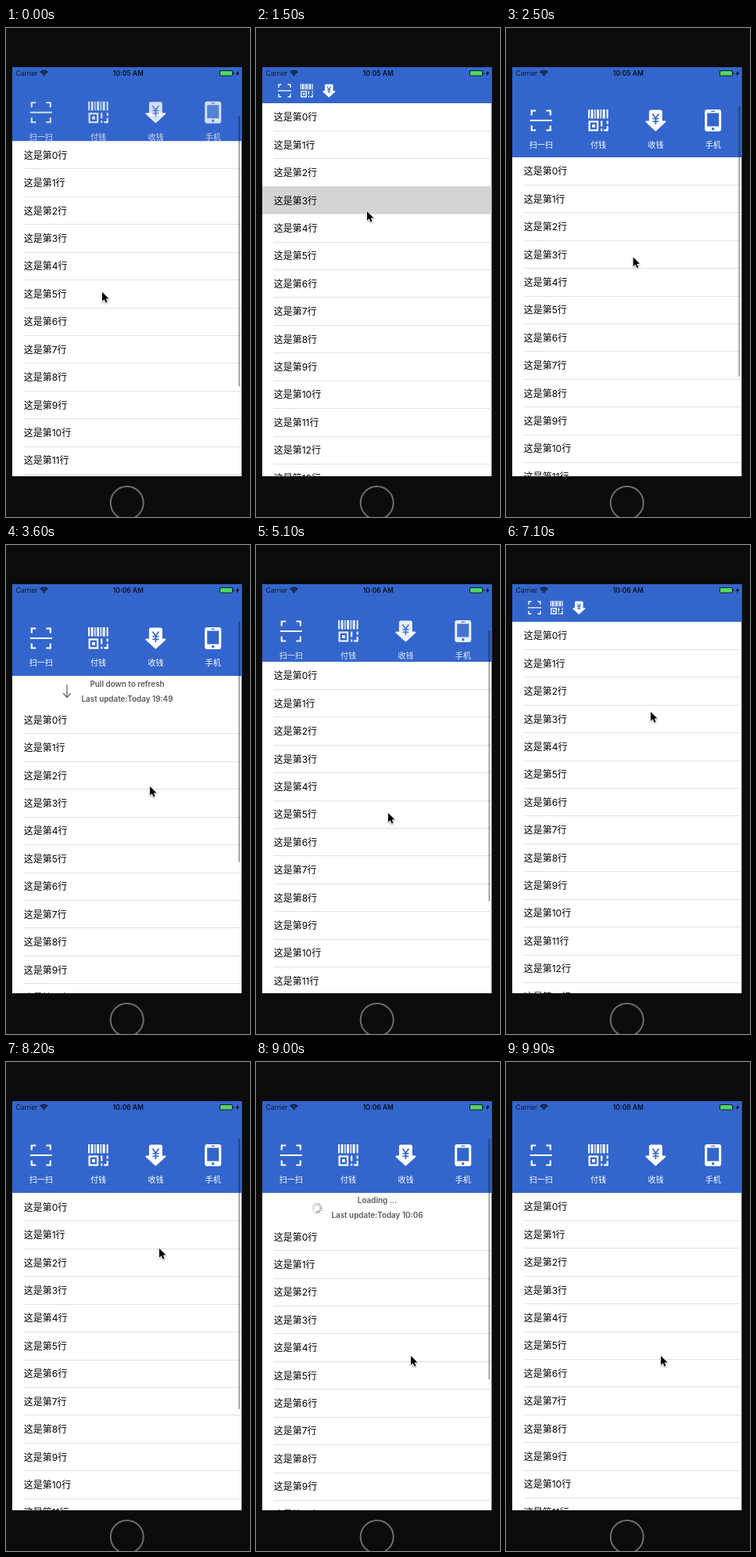
An HTML page with a canvas that plays this animation: 312 px wide and 624 px high, repeating every 10000 ms.

```html
<!DOCTYPE html>
<html lang="zh-CN">
<head>
<meta charset="utf-8">
<style>
html, body { margin: 0; width: 100%; height: 100%; overflow: hidden; background: #0b0b0b; }
canvas { display: block; width: 312px; height: 624px; }
</style>
</head>
<body>
<canvas id="stage"></canvas>
<script>
const canvas = document.getElementById('stage');
const ctx = canvas.getContext('2d');
const ratio = window.devicePixelRatio || 1;
canvas.width = 312 * ratio;
canvas.height = 624 * ratio;

const LOOP = 10000, STEP = 100;
const BLUE = '#3366cc';
const FONT = 'Inter, "Noto Sans CJK SC", "Noto Sans CJK", sans-serif';
const ROW = 35.42, EXPANDED = 167, COLLAPSE = 71, REFRESH = 38.3;
const LEFT = 8, RIGHT = 301.5, TOP = 50, BOTTOM = 572;

// time, scroll offset (negative while pulling down)
const SCROLL = [
  [0, 22.5], [300, 42], [500, 56], [800, 71], [1500, 71], [1600, 70], [2000, 30],
  [2400, 3], [2700, 0], [3150, 0], [3600, -38.5], [3900, -58], [4050, -58],
  [4250, -REFRESH], [4450, -REFRESH], [4750, 0], [4800, 0], [5100, 18], [5600, 48],
  [6300, 71], [7000, 71], [7100, 69], [7500, 28], [7800, 2], [8000, 0], [8180, 0],
  [8200, -0.5], [8500, -42], [8700, -60], [8800, -60], [9000, -REFRESH],
  [9500, -REFRESH], [9850, 0]
];
// time, pointer x, pointer y
const POINTER = [
  [0, 123, 337], [500, 126, 300], [1100, 142, 234], [1500, 142, 234], [2000, 155, 274],
  [2400, 160, 302], [3150, 180, 231], [3600, 184, 308], [3900, 186, 347], [4400, 180, 360],
  [4800, 172, 360], [5100, 169, 342], [5600, 170, 312], [6000, 172, 295], [6600, 182, 225],
  [7000, 185, 211], [7100, 185, 213], [7500, 188, 254], [7800, 191, 280], [8180, 196, 237],
  [8200, 196, 238], [8500, 197, 322], [8700, 198, 358], [8900, 198, 375]
];
const BAR_VISIBLE = [[0, 800], [1600, 2800], [3200, 4200], [4900, 6300], [7200, 9300]];
const LOADING = [[4050, 4450], [8800, 9500]];

const clamp = (v, lo = 0, hi = 1) => Math.min(hi, Math.max(lo, v));
const within = (t, spans) => spans.some(([a, b]) => t >= a && t < b);

function sample(keys, t, column = 1) {
  const i = keys.findIndex(k => k[0] > t);
  if (i < 0) return keys[keys.length - 1][column];
  const a = keys[i - 1], b = keys[i];
  return a[column] + (b[column] - a[column]) * (t - a[0]) / (b[0] - a[0]);
}

function rect(x, y, w, h, color) {
  ctx.fillStyle = color;
  ctx.fillRect(x, y, w, h);
}

function roundRect(x, y, w, h, r, color) {
  ctx.fillStyle = color;
  ctx.beginPath();
  ctx.roundRect(x, y, w, h, r);
  ctx.fill();
}

function shape(points, color) {
  ctx.fillStyle = color;
  ctx.beginPath();
  points.forEach(([x, y]) => ctx.lineTo(x, y));
  ctx.closePath();
  ctx.fill();
}

function line(points, color, width) {
  ctx.strokeStyle = color;
  ctx.lineWidth = width;
  ctx.beginPath();
  points.forEach(([x, y], i) => i ? ctx.lineTo(x, y) : ctx.moveTo(x, y));
  ctx.stroke();
}

function text(str, x, y, size, color, weight = 400, align = 'left') {
  ctx.font = `${weight} ${size}px ${FONT}`;
  ctx.textAlign = align;
  ctx.textBaseline = 'alphabetic';
  ctx.fillStyle = color;
  ctx.fillText(str, x, y + size * 0.37);
}

function clipped(x, y, w, h, draw) {
  ctx.save();
  ctx.beginPath();
  ctx.rect(x, y, w, h);
  ctx.clip();
  draw();
  ctx.restore();
}

// Icons are drawn around 0,0 in a box of about 28 units.
function scanIcon() {
  for (const sx of [-1, 1]) for (const sy of [-1, 1])
    line([[sx * 6.5, sy * 12.5], [sx * 12, sy * 12.5], [sx * 12, sy * 6.5]], '#fff', 2.2);
  rect(-14, -1, 28, 2, '#fff');
}

function payIcon() {
  [[-13, 2], [-9.5, 3], [-5, 1.5], [-2, 3], [2.5, 1.5], [5.5, 3], [10.5, 2]]
    .forEach(([x, w]) => rect(x, -14, w, 11.5, '#fff'));
  ctx.strokeStyle = '#fff';
  ctx.lineWidth = 2.2;
  ctx.strokeRect(-11.5, 1.5, 10.5, 11);
  rect(-8, 5, 3.8, 4, '#fff');
  rect(3, 0.5, 2.2, 7, '#fff');
  rect(3, 10.5, 2.2, 3, '#fff');
  rect(10.5, 0.5, 2.2, 4, '#fff');
  rect(10.5, 7, 2.2, 6.5, '#fff');
  rect(7, 11.3, 5, 2.2, '#fff');
}

function collectIcon() {
  roundRect(-8.5, -13.5, 17, 18, 2.5, '#fff');
  ctx.lineJoin = 'round';
  const head = [[-12, 1.5], [12, 1.5], [0, 12.5], [-12, 1.5], [12, 1.5]];
  shape(head, '#fff');
  line(head, '#fff', 2);
  line([[-4, -8.5], [0, -3], [4, -8.5]], BLUE, 1.7);
  line([[0, -3], [0, 5]], BLUE, 1.7);
  line([[-4, -2.3], [4, -2.3]], BLUE, 1.4);
  line([[-4, 1.2], [4, 1.2]], BLUE, 1.4);
  ctx.lineJoin = 'miter';
}

function phoneIcon() {
  roundRect(-10.5, -14, 21, 28, 3, '#fff');
  rect(-7.5, -9.5, 15, 17, BLUE);
  rect(-2.5, -12.3, 5, 1.2, BLUE);
  ctx.fillStyle = BLUE;
  ctx.beginPath();
  ctx.arc(0, 10.7, 1.7, 0, 7);
  ctx.fill();
}

const ACTIONS = [['扫一扫', scanIcon], ['付钱', payIcon], ['收钱', collectIcon], ['手机', phoneIcon]];

function placed(draw, x, y, scale = 1) {
  ctx.save();
  ctx.translate(x, y);
  ctx.scale(scale, scale);
  draw();
  ctx.restore();
}

function drawHeader(s) {
  const bottom = EXPANDED - clamp(s, 0, COLLAPSE);
  const shift = clamp(s, 0, COLLAPSE) / 2;
  clipped(LEFT, TOP, RIGHT - LEFT, bottom - TOP, () => {
    rect(LEFT, TOP, RIGHT - LEFT, bottom - TOP, BLUE);
    ctx.globalAlpha = clamp(1 - (s - 14) / 38);
    ACTIONS.forEach(([label, icon], i) => {
      const x = 44.8 + i * 73.3;
      placed(icon, x, 119 - shift);
      text(label, x, 150.5 - shift, 10, '#fff', 300, 'center');
    });
    ctx.globalAlpha = clamp((s - 40) / 26);
    ACTIONS.slice(0, 3).forEach(([, icon], i) => placed(icon, 36.5 + i * 28.4, 80, 0.62));
    ctx.globalAlpha = 1;
  });
}

function drawStatus(t) {
  text('Carrier', 12.5, 58, 8.5, '#10182a');
  ctx.lineCap = 'butt';
  for (const r of [2.6, 4.6, 6.6]) {
    ctx.strokeStyle = '#0a0f1c';
    ctx.lineWidth = 1.4;
    ctx.beginPath();
    ctx.arc(48.5, 61, r, -Math.PI * 0.76, -Math.PI * 0.24);
    ctx.stroke();
  }
  shape([[47, 60], [50, 60], [48.5, 61.5]], '#0a0f1c');
  text(t < 2600 ? '10:05 AM' : '10:06 AM', 156.3, 58, 8.5, '#0a0f1c', 600, 'center');
  roundRect(273, 54, 17, 7.6, 2, '#10182a');
  roundRect(274, 55, 15, 5.6, 1.2, '#4cd964');
  rect(290.5, 56.5, 1, 2.6, '#10182a');
  shape([[297.3, 54], [293.7, 58.5], [295.6, 58.5], [294.7, 61.8], [298.4, 57.1], [296.4, 57.1]], '#0a0f1c');
}

function drawRefresh(t, s) {
  const top = EXPANDED - s - REFRESH;
  const loading = within(t, LOADING);
  const release = !loading && s < -39 && !(t > 4450 && t < 4800);
  const title = loading ? 'Loading ...' : release ? 'Release to refresh' : 'Pull down to refresh';
  const updated = t >= 4450 ? '10:06' : '19:49';
  text(title, 155, top + 9.7, 9.9, '#5a5a5a', 600, 'center');
  text('Last update:Today ' + updated, 155, top + 28.7, 9.9, '#5a5a5a', 600, 'center');
  ctx.save();
  ctx.translate(78, top + 19.5);
  if (loading) {
    ctx.rotate(Math.floor(t / STEP) * Math.PI / 6);
    for (let i = 0; i < 12; i++) {
      ctx.rotate(Math.PI / 6);
      ctx.globalAlpha = 0.25 + i * 0.06;
      line([[0, -3.5], [0, -7]], '#777', 1.4);
    }
  } else {
    if (release) ctx.rotate(Math.PI);
    line([[0, -8.5], [0, 7.5]], '#555', 1.2);
    line([[-5, 2.5], [0, 7.7], [5, 2.5]], '#555', 1.2);
  }
  ctx.restore();
}

function drawList(t, s) {
  clipped(LEFT, TOP, RIGHT - LEFT, BOTTOM - TOP, () => {
    rect(LEFT, TOP, RIGHT - LEFT, BOTTOM - TOP, '#fff');
    if (s < 0) drawRefresh(t, s);
    for (let i = 0; i < 15; i++) {
      const y = EXPANDED - s + i * ROW;
      if (i === 3 && t >= 1500 && t < 1700)
        rect(LEFT, Math.round(y), RIGHT - LEFT, 35.5, '#d4d4d4');
      else
        rect(22.5, Math.round(y + ROW - 0.5), RIGHT - 22.5, 1, '#e1e1e1');
      text(`这是第${i}行`, 22.7, y + 17.8, 12, '#000');
    }
  });
}

function drawScrollBar(t, s) {
  const fade = Math.max(...BAR_VISIBLE.map(([a, b]) => t < a ? 0 : clamp(1 - (t - b) / 250)));
  const top = 98 + Math.max(s, 0) * 0.62;
  roundRect(297.3, top, 2, 345.5 + Math.min(s, 0), 1, `rgba(0,0,0,${0.36 * fade})`);
}

function drawPointer(x, y) {
  const arrow = [[0, 0], [0, 11.6], [2.7, 9.2], [4.6, 13.4], [6.5, 12.6], [4.7, 8.4], [8.3, 8.2]];
  ctx.save();
  ctx.translate(x, y);
  ctx.shadowColor = 'rgba(0,0,0,.35)';
  ctx.shadowBlur = 2 * ratio;
  ctx.shadowOffsetY = ratio;
  ctx.lineJoin = 'round';
  line([...arrow, arrow[0]], '#fff', 1.6);
  ctx.shadowColor = 'transparent';
  shape(arrow, '#000');
  ctx.restore();
}

function draw(now) {
  const t = Math.floor(now % LOOP / STEP) * STEP;
  const s = sample(SCROLL, t);
  ctx.setTransform(ratio, 0, 0, ratio, 0, 0);
  rect(0, 0, 312, 624, '#0b0b0b');
  drawList(t, s);
  drawHeader(s);
  drawStatus(t);
  drawScrollBar(t, s);
  ctx.strokeStyle = '#6e6e6e';
  ctx.lineWidth = 2;
  ctx.beginPath();
  ctx.arc(154.7, 606, 21, 0, Math.PI * 2);
  ctx.stroke();
  drawPointer(sample(POINTER, t), sample(POINTER, t, 2));
}

const start = performance.now();
function tick() {
  draw(performance.now() - start);
  requestAnimationFrame(tick);
}
tick();
</script>
</body>
</html>
```
